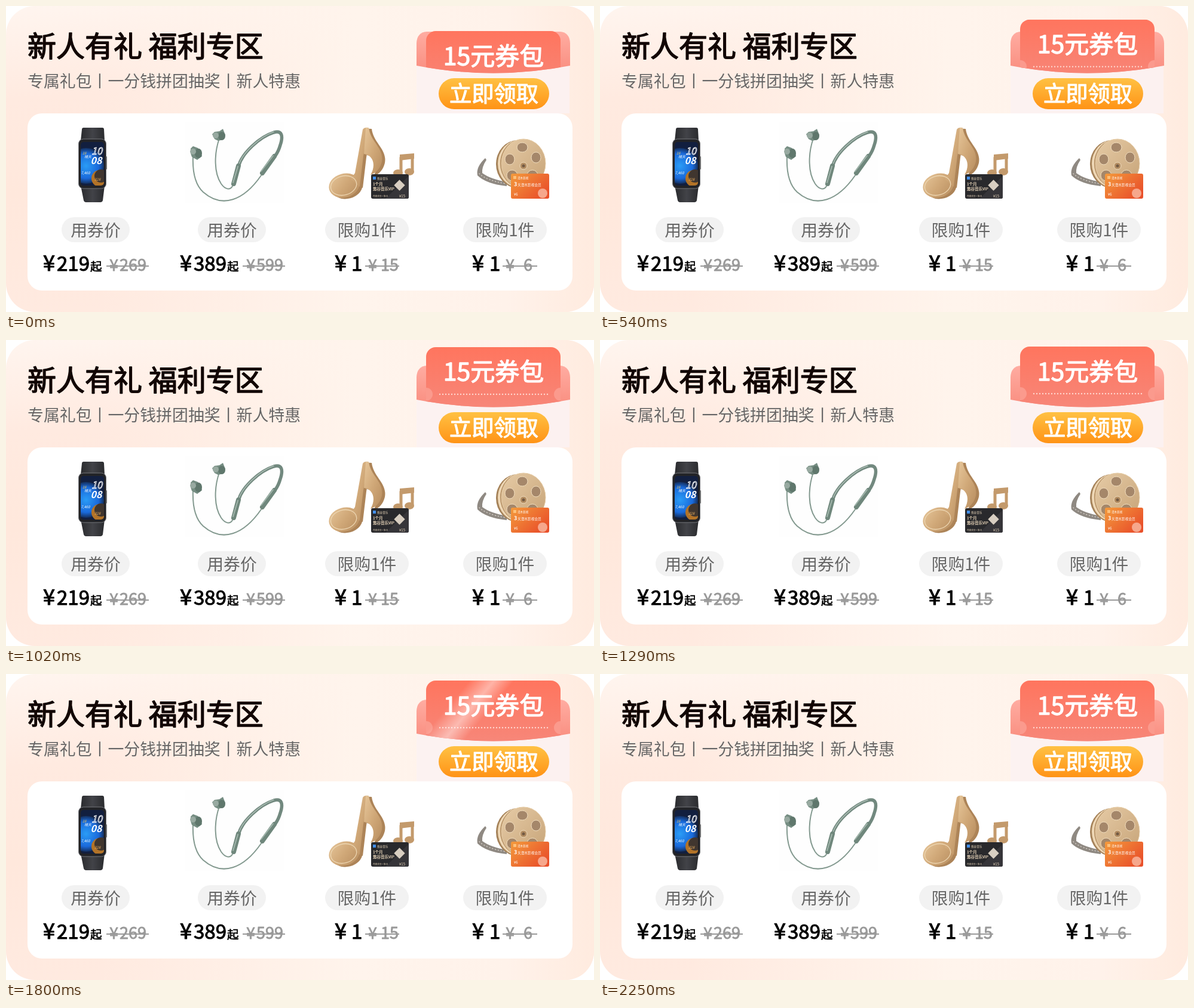
Animation, 984 px wide and 513 px high, one loop 2430 ms. Source, as an HTML page:

```html
<!DOCTYPE html>
<html lang="zh-CN">
<head>
<meta charset="utf-8">
<style>
html, body { margin: 0; width: 100%; height: 100%; overflow: hidden; background: #fff; }
svg { display: block; width: 984px; height: 513px; font-family: "Noto Sans CJK SC", "Noto Sans CJK", sans-serif; }
text { fill: currentColor; }
.mid { text-anchor: middle; }
/* a thin outline gives the medium weight */
.medium { stroke: currentColor; stroke-width: .032em; stroke-linejoin: round; }
.line { fill: none; stroke-linecap: round; stroke-linejoin: round; }
</style>
</head>
<body>
<svg viewBox="0 0 984 513">
  <defs>
    <linearGradient id="bg" x2=".15" y2="1">
      <stop stop-color="#fff5ef"/><stop offset=".3" stop-color="#ffeae0"/>
      <stop offset=".6" stop-color="#ffe8dc"/><stop offset="1" stop-color="#ffeae0"/>
    </linearGradient>
    <linearGradient id="bgRight">
      <stop offset=".15" stop-color="#fff4ec" stop-opacity="0"/><stop offset=".6" stop-color="#fff4ec"/>
      <stop offset=".85" stop-color="#fff2ea"/><stop offset="1" stop-color="#ffebdf"/>
    </linearGradient>
    <linearGradient id="pocket" x2="0" y2="1"><stop stop-color="#ffaca1"/><stop offset="1" stop-color="#f98d7f"/></linearGradient>
    <linearGradient id="ticket" x2="0" y2="1"><stop stop-color="#ff755e"/><stop offset="1" stop-color="#f6887b"/></linearGradient>
    <linearGradient id="button" x2="0" y2="1"><stop stop-color="#ffc143"/><stop offset="1" stop-color="#ff9316"/></linearGradient>
    <linearGradient id="sheen">
      <stop stop-color="#fff" stop-opacity="0"/><stop offset=".55" stop-color="#fff" stop-opacity=".45"/>
      <stop offset="1" stop-color="#fff" stop-opacity="0"/>
    </linearGradient>
    <linearGradient id="gold" x2="1" y2="1"><stop stop-color="#e6c69a"/><stop offset=".5" stop-color="#d0a878"/><stop offset="1" stop-color="#b78d5f"/></linearGradient>
    <linearGradient id="disc" x2="1" y2="1"><stop stop-color="#e6cba6"/><stop offset="1" stop-color="#c6a377"/></linearGradient>
    <linearGradient id="orange" x2="1" y2=".7"><stop stop-color="#f39a3c"/><stop offset="1" stop-color="#e9502a"/></linearGradient>
    <linearGradient id="strap"><stop stop-color="#2a2b2e"/><stop offset=".5" stop-color="#424348"/><stop offset="1" stop-color="#2a2b2e"/></linearGradient>
    <radialGradient id="blue"><stop stop-color="#2a9cf6"/><stop offset=".7" stop-color="#1a6adb"/><stop offset="1" stop-color="#14305f"/></radialGradient>
    <clipPath id="slot"><path d="M687 0H944V100Q815.500 125 687 100Z"/></clipPath>
    <clipPath id="face"><rect x="125" y="228" width="39" height="73" rx="5"/></clipPath>
    <clipPath id="card"><rect x="703" y="11" width="225" height="140" rx="16"/></clipPath>
  </defs>

  <rect width="984" height="513" rx="48" fill="url(#bg)"/>
  <rect width="984" height="513" rx="48" fill="url(#bgRight)"/>
  <text class="medium" x="36" y="85" font-size="48" color="#120604">新人有礼 福利专区</text>
  <text x="36" y="136" font-size="26.9" color="#666">专属礼包丨一分钱拼团抽奖丨新人特惠</text>

  <rect x="687" y="100" width="256" height="80" fill="#fcf3f3" opacity=".85"/>
  <path d="M687 100V62Q688 44 704 43H927Q943 44 944 62V100Q815.500 125 687 100Z" fill="url(#pocket)"/>
  <g clip-path="url(#slot)">
    <g id="coupon">
      <g clip-path="url(#card)">
        <rect x="703" y="11" width="225" height="110" fill="url(#ticket)"/>
        <rect x="703" y="120" width="225" height="31" fill="#f6887b"/>
        <circle cx="703" cy="90" r="11" fill="#fb9a8d"/>
        <circle cx="928" cy="90" r="11" fill="#fb9a8d"/>
        <path class="line" d="M726 90H908" stroke="#ffd5cd" stroke-width="2.4" stroke-dasharray="0 5"/>
      </g>
      <text class="mid medium" x="816" y="67.5" font-size="41" color="#fff">15元券包</text>
    </g>
    <g clip-path="url(#card)"><rect id="shine" x="-75" width="75" height="140" fill="url(#sheen)"/></g>
  </g>
  <rect x="724" y="121" width="185" height="52" rx="26" fill="url(#button)"/>
  <text class="mid medium" x="816.5" y="161" font-size="37.3" color="#fff">立即领取</text>

  <rect x="36" y="180" width="912" height="297" rx="24" fill="#fff"/>

  <!-- fitness band -->
  <path d="M127 207Q127 204 130 204H161Q164 204 164 207L165 226H125ZM125 301H165L162 326Q161 329 158 329H134Q131 329 130 326Z" fill="url(#strap)"/>
  <rect x="167" y="252" width="2" height="22" rx="1" fill="#666"/>
  <rect x="121.500" y="223" width="46" height="83" rx="8" fill="#222327" stroke="#77787c"/>
  <g clip-path="url(#face)">
    <rect x="125" y="228" width="39" height="73" fill="#121f3f"/>
    <circle cx="134" cy="268" r="30" fill="url(#blue)"/>
    <circle cx="157" cy="289" r="14" fill="#b27328"/>
    <circle cx="159" cy="285" r="11" fill="#40362f"/>
  </g>
  <g class="mid" color="#fff" font-style="italic">
    <text x="152" y="249" font-size="16" style="fill:none" stroke="#fff" stroke-width=".9">10</text>
    <text x="151" y="265" font-size="16" font-weight="700">08</text>
    <g font-size="6"><text x="131" y="249" color="#f6c64a">18</text><text x="137" y="255">晴天</text><text x="133" y="282">7,460</text><text x="153" y="293" color="#ffbd65">328</text></g>
  </g>

  <!-- neckband earphones -->
  <rect x="300" y="194" width="166" height="136" fill="#fefefe"/>
  <g class="line" stroke="#83998f">
    <path d="M313 252C312 276 315 298 330 312C362 340 398 326 427 284" stroke-width="2"/>
    <path d="M357 222C348 248 348 280 360 298C367 308 375 309 379 302" stroke-width="2"/>
    <path d="M390 266C396 247 423 220 448 212C462 208 464 218 459 233Q456 244 450 252" stroke="#72897f" stroke-width="5.5"/>
    <path d="M390 265C396 247 423 220 448 211" stroke="#a9bbb2" stroke-width="1.6"/>
    <path d="M389 268L381 298M449 252L429 280" stroke="#6f877c" stroke-width="8"/>
    <path d="M388 269L380 296M447 251L427 277" stroke="#a1b5ab" stroke-width="2"/>
  </g>
  <g fill="#758d82">
    <path d="M309 239L313 235 321 238 326 244 328 252 320 258 311 253 309 247ZM345 215L349 211 357 210 363 206 367 216 364 224 355 226 349 223Z"/>
    <ellipse cx="322" cy="247" rx="6" ry="8" fill="#5f776c"/>
    <ellipse cx="361" cy="218" rx="6" ry="7" fill="#5f776c"/>
    <circle cx="313" cy="244" r="5" fill="#98aaa1"/>
    <circle cx="351" cy="217" r="5" fill="#98aaa1"/>
  </g>

  <!-- music notes -->
  <defs>
    <g id="note">
      <ellipse cx="566" cy="301" rx="26" ry="20" transform="rotate(-15 566 301)"/>
      <path d="M597 207Q600 203 606 204L598 252 592 303 577 290 584 280Z"/>
      <path d="M602 204H607C610 228 633 238 629 261Q625 278 610 283C620 266 614 250 599 248Z"/>
    </g>
  </defs>
  <use href="#note" x="5" y="2" fill="#ad8458"/>
  <use href="#note" fill="url(#gold)"/>
  <ellipse class="line" cx="565" cy="301" rx="22" ry="16" transform="rotate(-15 565 301)" stroke="#edd6b2" stroke-width="1.3"/>
  <g fill="#c39a6c">
    <path class="line" d="M661 279V254L680 251V277" stroke="#c39a6c" stroke-width="5"/>
    <path d="M659 249L683 247V256L659 259Z"/>
    <ellipse cx="656" cy="280" rx="8" ry="6"/><ellipse cx="675" cy="278" rx="8" ry="6"/>
  </g>
  <rect x="611" y="282" width="63" height="41" rx="3" fill="#29292c"/>
  <path d="M635 323L674 285V320Q674 323 671 323Z" fill="#363539"/>
  <rect x="614" y="286" width="5" height="5" fill="#428fe9"/>
  <rect x="652" y="294" width="13" height="13" transform="rotate(45 658.5 300.500)" fill="#d8cec1"/>
  <g color="#f3dfc2">
    <text x="621" y="291" font-size="4.600">悠谷音乐</text>
    <text class="medium" x="614" y="301" font-size="6.500">1个月</text>
    <text class="medium" x="614" y="309" font-size="6.500">悠谷音乐VIP</text>
    <text x="614" y="320" font-size="3.600">月度会员一张卡</text>
    <text x="658" y="321" font-size="6">¥15</text>
  </g>

  <!-- film reel -->
  <path d="M802 255Q786 270 789 284Q803 298 838 302V295Q810 290 797 280Q796 270 804 258Z" fill="#8f8982"/>
  <path d="M792 281Q803 292 837 298" class="line" stroke="#cfc8c0" stroke-width="1.500" stroke-dasharray="1 4"/>
  <ellipse cx="856" cy="265" rx="36" ry="40" fill="#a58259"/>
  <ellipse cx="859" cy="264.500" rx="36" ry="40" fill="#eed7b5"/>
  <ellipse cx="862" cy="264" rx="35" ry="40" fill="#b08a5e"/>
  <ellipse cx="866" cy="264" rx="37" ry="41" fill="url(#disc)" stroke="#e8cfaa"/>
  <g fill="#a5876a" stroke="#f0dcbd">
    <ellipse cx="864" cy="237" rx="9" ry="8"/><ellipse cx="887" cy="254" rx="8" ry="9"/>
    <ellipse cx="843" cy="257" rx="8" ry="9"/><ellipse cx="847" cy="284" rx="9" ry="9"/>
    <ellipse cx="881" cy="284" rx="9" ry="9"/>
  </g>
  <circle cx="866" cy="268" r="6" fill="#b48e63" stroke="#f1ddbe"/>
  <circle cx="866" cy="268" r="2.500" fill="#735a43"/>
  <rect x="845" y="281" width="64" height="42" rx="3" fill="url(#orange)"/>
  <circle cx="898" cy="314" r="8" fill="#f6a78c"/>
  <rect x="849" y="285" width="5" height="5" fill="#ffc078"/>
  <g color="#fff">
    <text x="856" y="290" font-size="4.600">澄木影视</text>
    <text x="850" y="302" font-size="9" font-weight="700">3</text>
    <text x="856" y="301.500" font-size="5.700">天澄木影视会员</text>
    <text x="850" y="318" font-size="6">¥6</text>
  </g>

  <g id="offers"></g>
</svg>
<script>
const $ = id => document.getElementById(id);
const text = (s, x, size, color, y = 444, cls = "medium") =>
  `<text class="${cls}" x="${x}" y="${y}" font-size="${size}" color="${color}">${s}</text>`;

// label, pill x and width, yen x, price, price x, old yen x, old price, old price x, strike x1 and x2
const offers = [
  ["用券价", 93, 114, 62, 219, 85, 173, 269, 190, 168, 239],
  ["用券价", 321, 114, 291, 389, 314, 402, 599, 419, 396, 467],
  ["限购1件", 534, 140, 550, 1, 578, 606, 15, 627, 601, 658],
  ["限购1件", 765, 140, 780, 1, 809, 836, 6, 866, 831, 889]
];
$("offers").innerHTML = offers.map(([label, x, w, yenX, price, priceX, oldYenX, old, oldX, from, to]) =>
  `<rect x="${x}" y="354" width="${w}" height="42" rx="21" fill="#f2f2f2"/>` +
  text(label, x + w / 2, 27.8, "#666", 385.5, "mid") +
  text("¥", yenX, 36, "#000") + text(price, priceX, 33, "#000") +
  (price > 1 ? text("起", priceX + 56, 19.5, "#000") : "") +
  text("¥", oldYenX, 27, "#999") + text(old, oldX, 27, "#999") +
  `<path d="M${from} 436H${to}" stroke="#999" stroke-width="2"/>`
).join("");

const LOOP = 2430, DROP = 31;
function draw(now) {
  const t = now % LOOP;
  const y = t < 360 ? DROP : t < 1290 ? DROP * Math.exp((350 - t) / 195) : 0;
  $("coupon").setAttribute("transform", `translate(0 ${y})`);

  const p = Math.min(1, Math.max(0, (t - 1530) / 720));
  const ease = (p + (1 - Math.cos(Math.PI * p)) / 2) / 2;
  $("shine").setAttribute("transform", `translate(${703 + 430 * ease} 11) skewX(-40)`);
  $("shine").setAttribute("visibility", p > 0 && p < 1 ? "visible" : "hidden");
  requestAnimationFrame(draw);
}
draw(performance.now());
</script>
</body>
</html>
```
